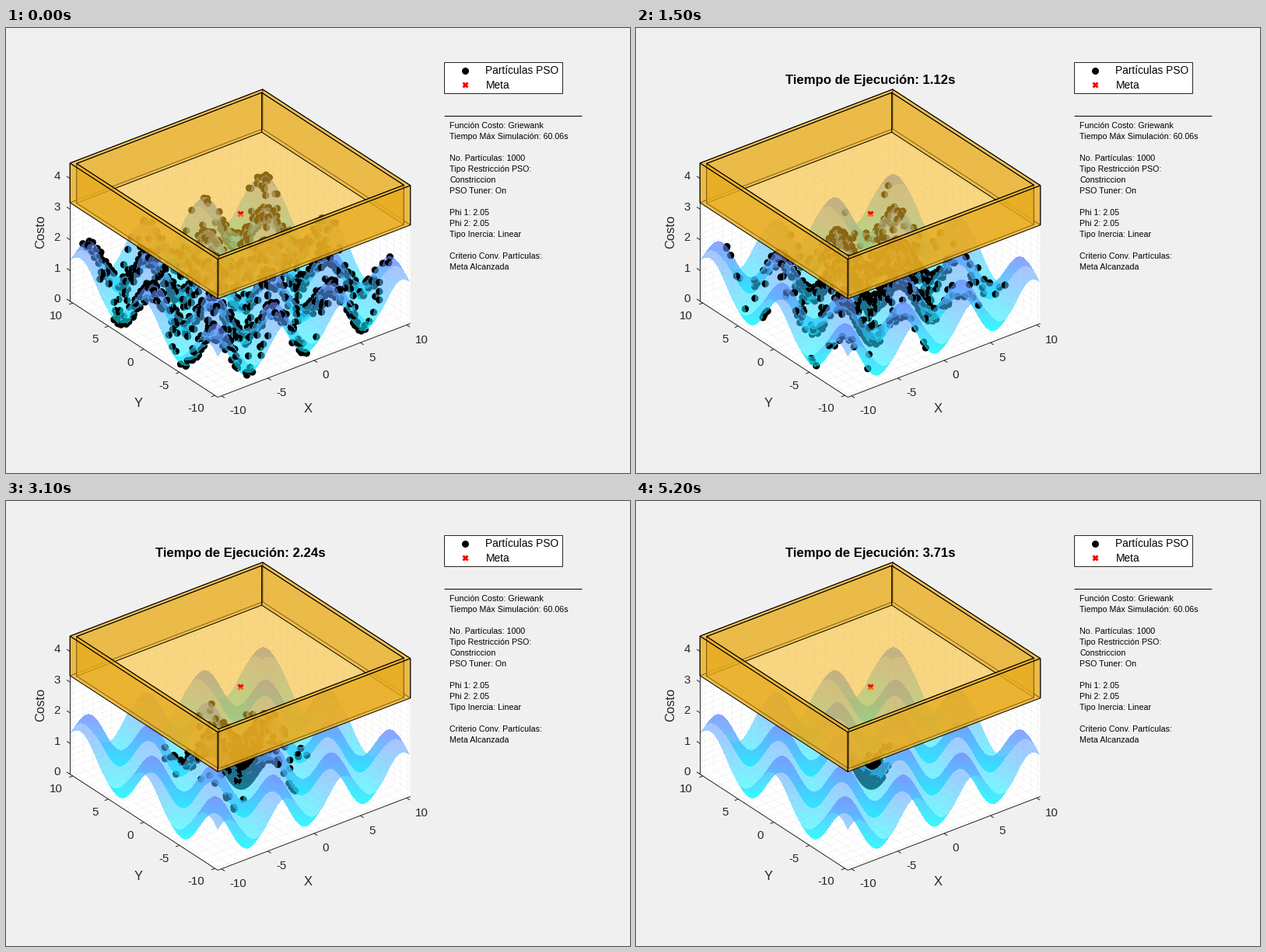
A matplotlib script that plays this animation: 802 by 573 pixels, repeating every 5.3 s.

```python
import numpy as np
import matplotlib.pyplot as plt
from matplotlib.animation import FuncAnimation
from matplotlib.collections import LineCollection
from matplotlib.patches import Polygon, Rectangle

W, H, DPI = 802, 573, 64
PT = 72 / DPI                       # points per pixel
FRAMES, INTERVAL = 53, 100
plt.rcParams["font.family"] = "Liberation Sans"

# Orthographic view: azimuth -37.5, elevation 30
CX, CY, SCALE, ZS = 300.5, 365.6, 15.0, 39.5
CA, SA = np.cos(np.radians(37.5)), np.sin(np.radians(37.5))
LIM, INNER = 10.4, 10.0             # outer and inner side of the walls
Z_LOW, Z_TOP = 3.21, 4.5            # bottom and top of the walls
INK = (0.15, 0.15, 0.15)


def project(x, y, z):
    px = CX + SCALE * (CA * x - SA * y)
    py = CY - SCALE / 2 * (SA * x + CA * y) - ZS * z
    return px, py


def unproject(px, py, z):
    """World x, y of the point at height z seen at a pixel."""
    a = (px - CX) / SCALE
    b = -2 * (py + ZS * z - CY) / SCALE
    return CA * a + SA * b, -SA * a + CA * b


def depth(py, z):
    """Nearness to the viewer of the point at height z on a pixel's ray."""
    return np.sqrt(3) * (py - CY) + ZS * z * 4 / np.sqrt(3)


def griewank(x, y):
    return 1 + (x**2 + y**2) / 4000 - np.cos(x) * np.cos(y / np.sqrt(2))


# ---- translucent cost surface, one layer per crossing of each view ray
X0, X1, Y0, Y1 = 70, 530, 165, 492
GX, GY = np.meshgrid(np.arange(X0, X1), np.arange(Y0, Y1))
LAYERS, ALPHA = 6, 0.56


def trace_surface():
    heights = np.full((LAYERS,) + GX.shape, -1.0)
    count = np.zeros(GX.shape, int)
    levels = np.linspace(-0.02, 2.12, 90)
    dz = levels[1] - levels[0]
    prev = None
    for z in levels:
        gap = z - griewank(*unproject(GX, GY, z))
        if prev is not None:
            rows, cols = np.nonzero((prev < 0) != (gap < 0))
            g0, g1 = prev[rows, cols], gap[rows, cols]
            hit = z - dz * g1 / (g1 - g0)
            x, y = unproject(GX[rows, cols], GY[rows, cols], hit)
            ok = (abs(x) <= LIM) & (abs(y) <= LIM)
            rows, cols, hit = rows[ok], cols[ok], hit[ok]
            slot = np.minimum(count[rows, cols], LAYERS - 1)
            heights[slot, rows, cols] = hit
            count[rows, cols] += 1
        prev = gap
    return heights


def shade(heights):
    """Light that each layer adds, and what all of them let through."""
    light = np.zeros(heights.shape + (3,))
    through = np.ones(GX.shape)
    for k in reversed(range(LAYERS)):
        a = np.where(heights[k] > -0.5, ALPHA, 0)
        t = np.clip(heights[k] / Z_TOP, 0, 1)
        cool = np.stack([t, 1 - t, np.ones_like(t)], axis=-1)
        light[k] = cool * (a * through)[..., None]
        through = through * (1 - a)
    return light, through


HEIGHTS = trace_surface()
LIGHT, THROUGH = shade(HEIGHTS)
NEARNESS = depth(GY, HEIGHTS)

# ---- swarm
COUNT, RADIUS = 1000, 4.6
rng = np.random.default_rng(12)
home = rng.uniform(-INNER, INNER, (2, COUNT))
swing = rng.normal(0, 1.8, (2, COUNT))
speed = rng.uniform(0.15, 0.4, (2, COUNT))
rest = rng.normal(0, 1, (2, COUNT))
turn = rng.uniform(-0.12, 0.12, COUNT)
slow = rng.random(COUNT) ** 3       # a few stragglers


def swarm(n):
    m = max(n - 8, 0)
    pull = np.exp(-(m / (8 + 23 * slow)) ** (0.8 + 1.3 * slow))
    roam = np.clip(home + swing * np.sin(speed * n), -INNER, INNER)
    c, s = np.cos(turn * n), np.sin(turn * n)
    orbit = np.stack([c * rest[0] - s * rest[1], s * rest[0] + c * rest[1]])
    spread = 0.38 + 0.42 * np.exp(-m / 15)
    pos = roam * pull + orbit * spread * (1 - pull)
    return np.clip(pos, -INNER, INNER)


OX, OY = (o.ravel() for o in np.meshgrid(np.arange(-6, 7), np.arange(-6, 7)))


def render(n):
    x, y = swarm(n)
    z = griewank(x, y)
    px, py = project(x, y, z)
    near = depth(py + ZS * z - ZS * z, z)
    cols = np.rint(px).astype(int)[:, None] + OX
    rows = np.rint(py).astype(int)[:, None] + OY
    dist = np.hypot(cols - px[:, None], rows - py[:, None])
    cover = np.clip(RADIUS + 0.5 - dist, 0, 1)
    idx = (rows - Y0) * (X1 - X0) + cols - X0
    mask = cover > 0
    near = np.broadcast_to(near[:, None], idx.shape)

    dots = np.zeros(GX.size)
    np.maximum.at(dots, idx[mask], cover[mask])
    front = np.full(GX.size, -1e9)
    solid = cover > 0.3
    np.maximum.at(front, idx[solid], near[solid])
    dots, front = dots.reshape(GX.shape), front.reshape(GX.shape)

    rgb = np.zeros(GX.shape + (3,))
    for k in range(LAYERS):
        keep = np.where(NEARNESS[k] < front, 1 - dots, 1)
        rgb += LIGHT[k] * keep[..., None]
    alpha = 1 - (1 - dots) * THROUGH
    rgb /= np.maximum(alpha, 1e-6)[..., None]
    out = np.concatenate([rgb, alpha[..., None]], axis=-1)
    return (np.clip(out, 0, 1) * 255 + 0.5).astype(np.uint8)


# ---- stage
fig = plt.figure(figsize=(W / DPI, H / DPI), dpi=DPI, facecolor="#f0f0f0")
ax = fig.add_axes([0, 0, 1, 1])
ax.axis("off")


def face(points, color, alpha=1, edge=False, order=1):
    xy = np.array([project(*p) for p in points])
    ax.add_patch(Polygon(xy, facecolor=color, alpha=alpha, lw=0, zorder=order))
    if edge:
        ax.add_patch(Polygon(xy, fill=False, edgecolor="black", lw=PT,
                             joinstyle="round", zorder=order))


def line(p, q, color=INK, width=1, order=3):
    ax.plot([p[0], q[0]], [p[1], q[1]], color=color, lw=width * PT,
            solid_capstyle="butt", zorder=order)


def label(x, y, text, size, ha="center", **kw):
    """Text whose capitals are centred on y."""
    return ax.text(x, y + 0.36 * size, text, fontsize=size * PT, ha=ha,
                   va="baseline", zorder=12, **kw)


def wall(axis, at, half, z0=Z_LOW, z1=Z_TOP):
    ends = [(-half, z0), (half, z0), (half, z1), (-half, z1)]
    if axis == "x":
        return [(at, e, z) for e, z in ends]
    return [(e, at, z) for e, z in ends]


# white planes with a fine dotted grid
square = [(-LIM, -LIM), (LIM, -LIM), (LIM, LIM), (-LIM, LIM)]
face([(x, y, 0) for x, y in square], "white")
face(wall("x", LIM, LIM, 0), "white")
face(wall("y", LIM, LIM, 0), "white")

grid = []
for k in range(-10, 11):
    grid += [((k, -LIM, 0), (k, LIM, 0)), ((-LIM, k, 0), (LIM, k, 0)),
             ((LIM, k, 0), (LIM, k, Z_TOP)), ((k, LIM, 0), (k, LIM, Z_TOP))]
for z in np.arange(0.2, Z_TOP, 0.2):
    grid += [((LIM, -LIM, z), (LIM, LIM, z)), ((-LIM, LIM, z), (LIM, LIM, z))]
ax.add_collection(LineCollection(
    [[project(*p), project(*q)] for p, q in grid], colors=[(0.1, 0.1, 0.1, 0.2)],
    linewidths=0.8 * PT, linestyles=[(0, (1, 3))], zorder=1.5))

picture = ax.imshow(render(0), extent=(X0 - 0.5, X1 - 0.5, Y1 - 0.5, Y0 - 0.5),
                    interpolation="nearest", aspect="auto", zorder=2)

# axes, ticks and labels
corner = project(-LIM, -LIM, 0)
left = project(-LIM, LIM, 0)
line(corner, project(LIM, -LIM, 0))
line(corner, left)
line(left, project(-LIM, LIM, Z_TOP))
TICK = 15
for v in range(-10, 11, 5):
    px, py = project(v, -LIM, 0)
    line((px, py), (px + 4.2, py + 2.7))
    label(px + 10.5, py + 18, str(v), TICK, "left", color=INK)
    px, py = project(-LIM, v, 0)
    line((px, py), (px - 4.7, py + 1.8))
    label(px - 13.2, py + 16, str(v), TICK, "right", color=INK)
for v in range(5):
    px, py = project(-LIM, LIM, v)
    line((px, py), (px - 4.2, py - 2.7))
    label(px - 12.5, py - 4, str(v), TICK, "right", color=INK)
label(388, 489, "X", 16.5, color=INK)
label(170, 482, "Y", 16.5, color=INK)
ax.text(51.5, 262, "Costo", fontsize=16.5 * PT, rotation=90, ha="right",
        va="center", color=INK, zorder=12)

# goal: its lower half lies behind the tray floor
gx, gy = project(0, 0, Z_LOW + 0.02)


def cross(x, y, order):
    return ax.plot([x], [y], marker="x", ms=6.2 * PT, mew=3 * PT, color="red",
                   ls="none", zorder=order)[0]


cross(gx, gy, 3.5)
upper = cross(gx, gy, 9)

# translucent tray: floor, then walls from back to front
AMBER, SAND = (232 / 255, 172 / 255, 32 / 255), (246 / 255, 184 / 255, 35 / 255)
face([(x, y, Z_LOW) for x, y in square], SAND, 0.57, order=4)
sides = [(1, LIM), (1, INNER), (-1, INNER), (-1, LIM)]
for i, (sign, half) in enumerate(sides):
    for axis in "xy":
        face(wall(axis, sign * half, half), AMBER, 0.57, True, 5 + 0.5 * i)
for i in range(4):
    (ax0, ay0), (ax1, ay1) = square[i], square[(i + 1) % 4]
    f = INNER / LIM
    rim = [(ax0, ay0), (ax1, ay1), (ax1 * f, ay1 * f), (ax0 * f, ay0 * f)]
    face([(x, y, Z_TOP) for x, y in rim], AMBER, 0.45, order=7)
for half in (LIM, INNER):
    ring = [project(np.sign(x) * half, np.sign(y) * half, Z_TOP) for x, y in square]
    ax.add_patch(Polygon(ring, fill=False, edgecolor="black", lw=PT, zorder=8))

# legend
ax.add_patch(Rectangle((562, 43), 152, 40, facecolor="white", edgecolor=INK,
                       lw=PT, zorder=10))
ax.plot([589.5], [54], marker="o", ms=9 * PT, mew=0, color="black", zorder=11)
cross(589.5, 72.5, 11)
label(616, 54, "Partículas PSO", 13.8, "left")
label(616, 73, "Meta", 13.8, "left")

# run settings
line((562, 112), (739, 112), "black")
info = ["Función Costo: Griewank", "Tiempo Máx Simulación: 60.06s", "",
        "No. Partículas: 1000", "Tipo Restricción PSO:", "Constriccion",
        "PSO Tuner: On", "", "Phi 1: 2.05", "Phi 2: 2.05",
        "Tipo Inercia: Linear", "", "Criterio Conv. Partículas:",
        "Meta Alcanzada"]
for i, text in enumerate(info):
    label(570, 124.4 + 14 * i, text, 10.67, "left")

title = label(300.5, 65, "", 16.7, weight="bold")

ax.set_xlim(-0.5, W - 0.5)
ax.set_ylim(H - 0.5, -0.5)
upper.set_clip_path(Rectangle((gx - 10, gy - 10), 20, 10.5, transform=ax.transData))


def draw(n):
    picture.set_data(render(n))
    title.set_text(f"Tiempo de Ejecución: {(n + 1) * 0.07:.2f}s" if n else "")
    return picture, title


anim = FuncAnimation(fig, draw, frames=FRAMES, interval=INTERVAL, repeat=True)
plt.show()
```
